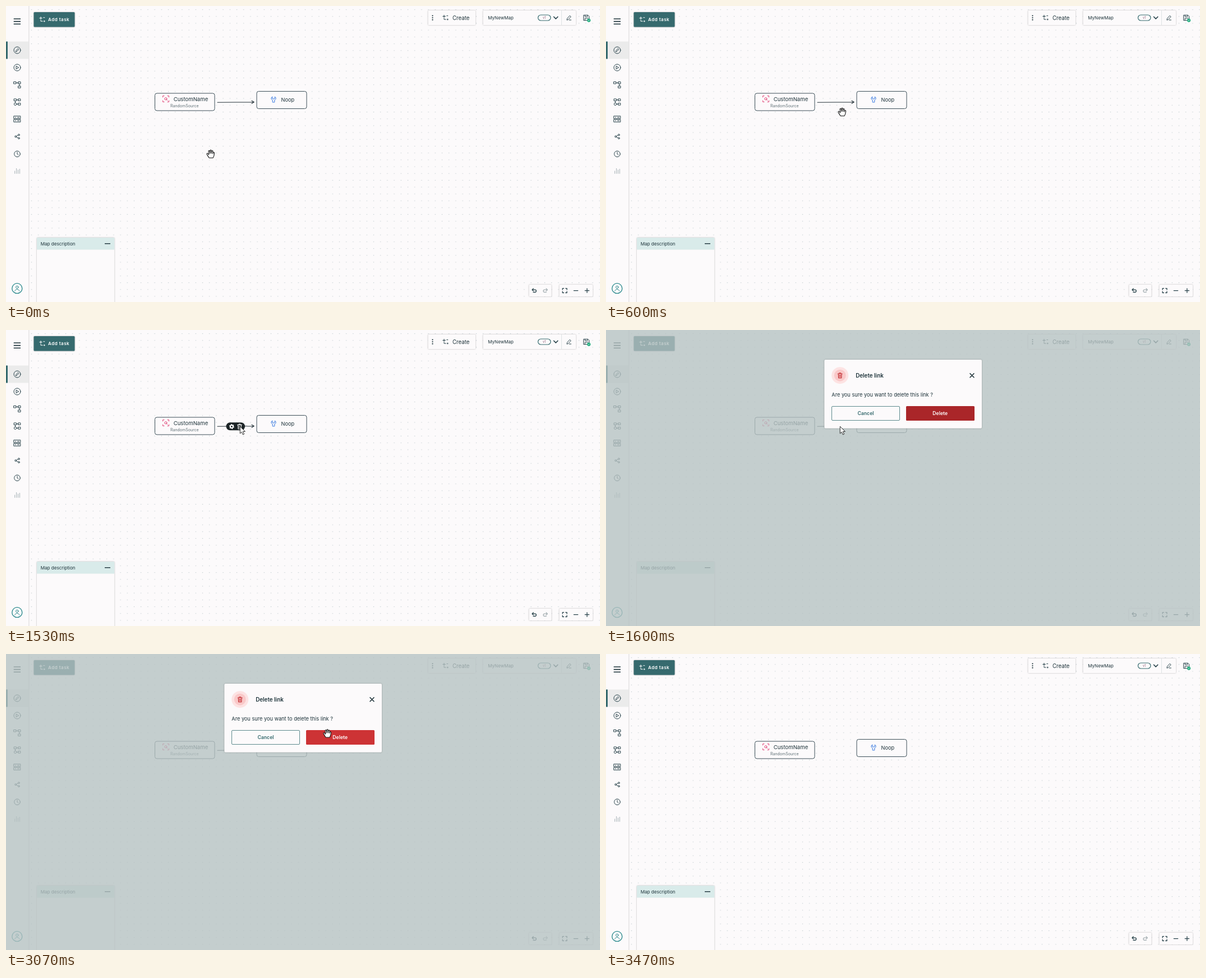
Animation, 1059 px wide and 529 px high, one loop 6740 ms. Source, as an HTML page:

```html
<!DOCTYPE html>
<html lang="en">
<head>
<meta charset="utf-8">
<title>Delete a link</title>
<style>
  html, body { margin: 0; width: 100%; height: 100%; overflow: hidden; background: #fcfafb; }
  svg { display: block; width: 1059px; height: 529px; }
  text { font-family: Inter, "Open Sans", sans-serif; fill: #1d333a; }
  .bold { font-weight: 600; }
  .line { fill: none; stroke: #29434b; stroke-width: 1; stroke-linecap: round; stroke-linejoin: round; }
  .card { fill: #fcfafb; filter: drop-shadow(0 .6px 1.3px rgba(0, 0, 0, .3)); }
</style>
</head>
<body>
<svg viewBox="0 0 1059 529">
  <defs>
    <pattern id="dots" x="39.4" y=".4" width="12.2" height="12.2" patternUnits="userSpaceOnUse">
      <circle cx="6.1" cy="6.1" r=".75" fill="#c4ced1"/>
    </pattern>
    <path id="flow" fill="none" stroke-linecap="round"
      d="M-4.5-2.5H0M-2.3-4.7V-.3M-2.3 1V3H1M2.5-3.5H4.5M3 3H5M4 2V4"/>
    <path id="bin" d="M-4-3H4M-1.5-3V-4.4H1.5V-3M-3-3L-2.6 4.4H2.6L3-3M-1-.8V2.4M1-.8V2.4"/>
  </defs>

  <rect width="1059" height="529" fill="#fcfafb"/>
  <rect x="41" width="1018" height="529" fill="url(#dots)"/>

  <!-- Graph -->
  <g id="link" class="line" style="stroke:#26343a;stroke-width:1.1">
    <path d="M377 172.3L442 171.7M438 169.2L442.3 171.7L438 174.3"/>
  </g>
  <g fill="#fcfafb" stroke="#3c4f58">
    <rect x="265.5" y="156" width="106.5" height="31" rx="3.5"/>
    <rect x="447" y="152.5" width="89" height="31" rx="3.5"/>
  </g>
  <g class="line" style="stroke:#e0396f" transform="translate(285 166)">
    <path d="M-5.4-3V-5.4H-3M3-5.4H5.4V-3M5.4 3V5.4H3M-3 5.4H-5.4V3M1.4 1.4L2.8 2.8"/>
    <circle cx="-.2" cy="-.2" r="2"/>
  </g>
  <text x="298.7" y="170.4" font-size="9.6">CustomName</text>
  <text x="293" y="181" font-size="7" style="fill:#5f7076">RandomSource</text>
  <path class="line" style="stroke:#3a7be0" transform="translate(477 167)"
    d="M-2.3-4.8C-5-3.5-4.8.2-1.8 1V5H1.8V1C4.8.2 5-3.5 2.3-4.8V-1.8L0-.8L-2.3-1.8Z"/>
  <text x="490.6" y="171.4" font-size="9.2">Noop</text>

  <g id="tools">
    <rect x="392.5" y="165.3" width="33.5" height="14" rx="7" fill="#1c2426"/>
    <g transform="translate(402.4 172.5)" fill="none" stroke="#fff">
      <circle r="2.5" stroke-width="2"/>
      <circle r="3.8" stroke-width="1.3" stroke-dasharray="1.9 2.08"/>
    </g>
    <use href="#bin" class="line" style="stroke:#fff" transform="translate(416.5 172.5)"/>
  </g>

  <!-- Sidebar -->
  <rect class="card" x="-3" y="-5" width="43.3" height="540"/>
  <rect y="63.5" width="40" height="31" fill="#ebebeb"/>
  <rect y="63.5" width="3" height="31" fill="#356a6e"/>
  <path d="M13.7 23H26M13.7 27.6H26M13.7 32.2H26" stroke="#1d333a" stroke-width="1.6"/>
  <g class="line">
    <g transform="translate(20 79)"><circle r="6"/><path d="M-2.6 2.6L-2.1.7L1.6-3L3-1.6L-.7 2.1Z"/></g>
    <g transform="translate(20 110)"><circle r="6"/><path d="M-1.6-2.6L2.6 0L-1.6 2.6Z"/></g>
    <path transform="translate(20 140.5)" d="M-6-5H-2V-1.5H-6ZM2-5H6V-1.5H2ZM2 2.5H6V6H2ZM-2-3.2H2M4-1.5V2.5"/>
    <g transform="translate(20 171.5)">
      <path d="M-5.5-5.5H-1.5V-2H-5.5ZM2-5.5H5.8V-2H2ZM2 2H5.8V5.6H2ZM-1.5-3.7H2M-3.5-2V1.5M-1 3.8H2"/>
      <circle cx="-3.4" cy="3.8" r="2.2"/>
    </g>
    <path transform="translate(20 202)" d="M-5.8-5.3H5.8V-.8H-5.8ZM-5.8.8H5.8V5.3H-5.8ZM-3.5-3H-2.5M.5-3H3.5M-3.5 3H-2.5M.5 3H3.5"/>
    <g transform="translate(20 233.3)">
      <path d="M-1.6-.7L1.6-2.5M-1.6.7L1.6 2.5"/>
      <circle cx="-2.9" r="1.4"/><circle cx="2.9" cy="-3" r="1.4"/><circle cx="2.9" cy="3" r="1.4"/>
    </g>
    <g transform="translate(20 264.4)"><circle r="5.3"/><path d="M0-3.2V0L2 1.7"/></g>
    <path transform="translate(20 295)" style="stroke:#a5b1b5" d="M-4.3 4.4V0M-1.4 4.4V-4.6M1.5 4.4V-2M4.4 4.4V-3.5"/>
    <g transform="translate(19.8 504.7)" style="stroke:#26878a">
      <circle r="9" stroke-width="1.3"/><circle cy="-2.2" r="2.2"/><path d="M-4 4.6C-3.6.6 3.6.6 4 4.6"/>
    </g>
  </g>

  <!-- Toolbars -->
  <rect class="card" x="49.5" y="11" width="73" height="26.5" rx="1.5" style="fill:#366a6e"/>
  <use href="#flow" transform="translate(64.3 24.2)" stroke="#fff"/>
  <text class="bold" x="75" y="27.2" font-size="8" letter-spacing=".5" style="fill:#fff">Add task</text>

  <rect class="card" x="752.5" y="8" width="84.5" height="26" rx="1.5"/>
  <g fill="#1d333a"><circle cx="760.5" cy="17.3" r="1.1"/><circle cx="760.5" cy="21" r="1.1"/><circle cx="760.5" cy="24.7" r="1.1"/></g>
  <use href="#flow" transform="translate(783.3 21)" stroke="#29434b"/>
  <text x="796" y="24.5" font-size="9.7">Create</text>

  <rect class="card" x="850.5" y="8" width="165.5" height="26" rx="1.5"/>
  <text x="859.3" y="24" font-size="8">MyNewMap</text>
  <rect x="948.5" y="16" width="22.5" height="10" rx="5" fill="#fcfafb" stroke="#356a6e" stroke-width="1.2"/>
  <text x="959.7" y="23" font-size="5.6" text-anchor="middle" style="fill:#8f5e78">v1</text>
  <path class="line" style="stroke-width:1.6" d="M976.6 19.2L980.2 22.9L983.8 19.2"/>
  <path d="M990.5 8V34" stroke="#dde2e3"/>
  <path class="line" d="M1000 24.8L1000.5 22.2L1005.2 17.2L1007.2 19.2L1002.4 24.2ZM1004 25H1007.5"/>
  <g class="line" transform="translate(1034.8 21)">
    <path d="M-4.7-4.7H2.8L4.8-2.7V4.7H-4.7ZM-2.6-4.7V-2H2V-4.7M-2.6 4.7V.8H2.6"/>
    <circle cx="4.3" cy="4.6" r="3.1" style="fill:#1bab7b;stroke:none"/>
    <path d="M2.9 4.6L4 5.7L5.9 3.6" style="stroke:#fff;stroke-width:.8"/>
  </g>

  <rect class="card" x="55" y="414" width="138.3" height="125" rx="1.5"/>
  <rect x="55" y="414" width="138.3" height="21.5" fill="#d9ebea"/>
  <text x="61.7" y="427.7" font-size="8.1">Map description</text>
  <path d="M176 424.7H186" stroke="#1d333a" stroke-width="1.4"/>

  <rect class="card" x="932.5" y="498" width="40" height="21" rx="1.5"/>
  <rect class="card" x="986.5" y="498" width="59.5" height="21" rx="1.5"/>
  <g class="line" style="stroke-width:1.3">
    <path id="undo" d="M940.2 505L938 507.2L940.2 509.4M938.3 507.2H943.2C946 507.2 946 511.5 943.2 511.5H940"/>
    <use href="#undo" transform="matrix(-1 0 0 1 1903.3 0)" opacity=".4"/>
    <path d="M992.2 507V504.7H994.5M997.7 504.7H1000V507M1000 510.2V512.5H997.7M994.5 512.5H992.2V510.2"/>
    <path d="M1012.3 508.6H1019.7M1032.2 508.6H1039.6M1035.9 504.9V512.3"/>
  </g>

  <!-- Dialog -->
  <g id="dialog">
    <rect width="1059" height="529" fill="rgb(182,194,195)" fill-opacity=".79"/>
    <rect class="card" x="389.3" y="53" width="280.7" height="122.7" rx="2"/>
    <circle cx="417.2" cy="81.2" r="15" fill="#fde3e3"/>
    <circle cx="417.2" cy="81.2" r="10.5" fill="#f9c9c9"/>
    <use href="#bin" class="line" style="stroke:#c22f33;stroke-width:1.1" transform="translate(417.2 81.2)"/>
    <text class="bold" x="445.2" y="84.6" font-size="9.8">Delete link</text>
    <path class="line" style="stroke:#152a31;stroke-width:1.5" d="M649 77.8L656 84.8M656 77.8L649 84.8"/>
    <text x="402.3" y="119.4" font-size="9.2">Are you sure you want to delete this link ?</text>
    <rect id="cancel" x="402.5" y="136.5" width="121" height="25" rx="1.5" stroke="#5d8a8d"/>
    <text class="bold" x="463" y="152" font-size="8.7" text-anchor="middle" style="fill:#366a6e">Cancel</text>
    <rect id="confirm" x="535" y="136" width="122" height="26" rx="1.5"/>
    <text class="bold" x="595.7" y="152" font-size="8.6" text-anchor="middle" style="fill:#fff">Delete</text>
  </g>

  <g id="cursor" fill="#fff" stroke="#161616" stroke-linejoin="round">
    <path id="arrow" d="M.3 .3V13L3.2 10.3L5.4 15L7.6 14L5.4 9.4H9.4Z" stroke-width=".9"/>
    <path id="hand" stroke-width="1.1" d="M-3.6 1.2L-5-.8C-6-2-7.6-.8-6.8.6C-5.6 2.4-4.4 5.2-2.8 7H4C5.4 5 6.2 2.4 6.6-1.6C6.8-3.2 4.8-3.6 4.4-2L4-.4V-4.8C4-6.2 2-6.2 1.8-4.8L1.6-1L1-6.4C.8-7.6-1.2-7.4-1-6L-.8-1L-2-5.4C-2.6-6.8-4.4-6-4-4.6L-3-.6Z"/>
  </g>
</svg>
<script>
  const LOOP = 6740, STEP = 200 / 3;
  const el = id => document.getElementById(id);

  // Pointer path: step, x, y
  const path = [
    [0, 365, 264.5], [2, 371, 258], [5, 400, 222], [7, 415, 200], [9, 421, 189.5], [11, 421, 180],
    [12, 421.5, 181.5], [17, 417, 172], [28, 417, 172], [29, 421, 170], [31, 455, 158],
    [34, 500, 142], [36, 522, 137], [37, 538, 133], [39, 576, 132], [40, 577, 137],
    [43, 573.5, 142], [46, 573, 142], [47, 574, 141.5], [48, 580, 141], [49, 602, 141],
    [50, 644, 141.5], [51, 899, 159.5]
  ];

  // Steps of 1/15 s, each starting on a whole hundredth of a second
  const start = k => Math.round(k * STEP / 10) * 10;
  function stepAt(t) {
    const k = Math.round(t / STEP);
    return start(k) > t ? k - 1 : k;
  }

  function pointAt(k) {
    const i = path.findIndex(p => p[0] >= k);
    if (i < 0) return path[path.length - 1].slice(1);
    if (i === 0) return path[0].slice(1);
    const [k0, x0, y0] = path[i - 1], [k1, x1, y1] = path[i];
    const f = (k - k0) / (k1 - k0);
    return [x0 + (x1 - x0) * f, y0 + (y1 - y0) * f];
  }

  const show = (id, on) => el(id).style.display = on ? "" : "none";
  const within = (k, a, b) => k >= a && k < b;

  function draw(t) {
    const k = stepAt(t);
    const overCancel = within(k, 31, 37);
    const isArrow = within(k, 12, 40) && !overCancel;
    show("link", k < 47);
    show("tools", within(k, 12, 24));
    show("dialog", within(k, 24, 47));
    show("cursor", k < 52);
    show("arrow", isArrow);
    show("hand", !isArrow);
    el("cancel").setAttribute("fill", overCancel ? "#eef4f4" : "#fcfafb");
    el("confirm").setAttribute("fill", k >= 40 ? "#cd3335" : "#aa2629");
    el("cursor").setAttribute("transform", `translate(${pointAt(k)})`);
  }

  const t0 = performance.now();
  function tick() {
    draw((performance.now() - t0) % LOOP);
    requestAnimationFrame(tick);
  }
  draw(0);
  requestAnimationFrame(tick);
</script>
</body>
</html>
```
